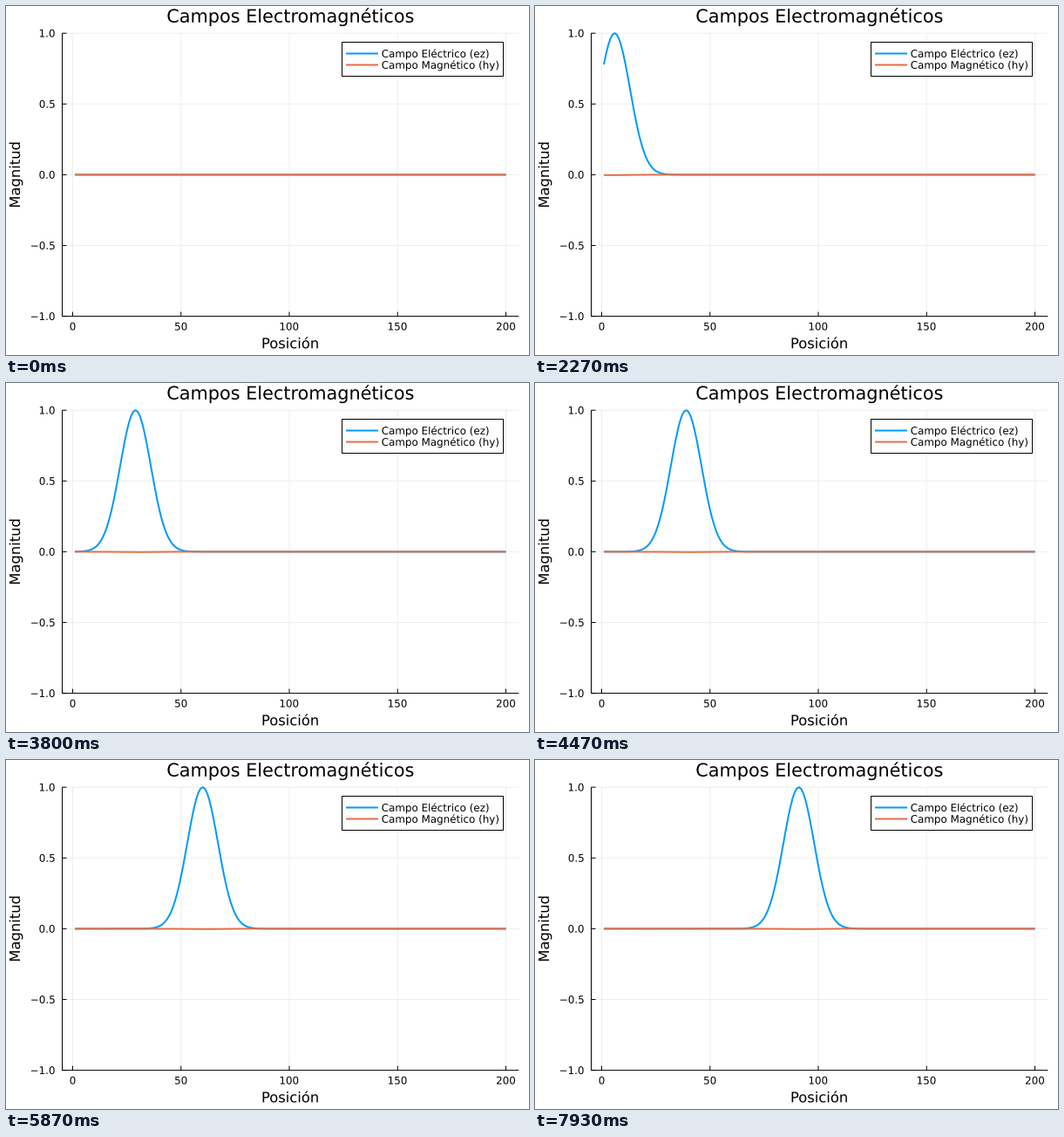
Animation, 600 px wide and 400 px high, one loop 8000 ms. Source, as a matplotlib script:

```python
import numpy as np
import matplotlib.pyplot as plt
from matplotlib.animation import FuncAnimation
from matplotlib.patches import PathPatch, Rectangle
from matplotlib.textpath import TextPath
from matplotlib.transforms import Affine2D

WIDTH, HEIGHT, DPI = 600, 400, 100
LOOP_MS, INTERVAL = 8000, 20
STEPS_PER_MS = 15 / 1000
LEFT, RIGHT, TOP, BOTTOM = 64.5, 588.3, 31.2, 355.6
BLUE, ORANGE, GRID = "#009AFA", "#E36F47", "#EEEEEE"
IMPEDANCE = 377

fig = plt.figure(figsize=(WIDTH / DPI, HEIGHT / DPI), dpi=DPI, facecolor="white")
ax = fig.add_axes([0, 0, 1, 1])
ax.set(xlim=(0, WIDTH), ylim=(HEIGHT, 0))
ax.axis("off")


def to_x(position):
    return 76.5 + 2.485 * position


def to_y(value):
    return (TOP + BOTTOM) / 2 - value * (BOTTOM - TOP) / 2


def stroke(x, y, color="black", width=1.0, **style):
    return ax.plot(x, y, color=color, lw=width * 72 / DPI, snap=False,
                   solid_capstyle="butt", **style)[0]


def label(x, y, text, size=11.9, align=0.5, angle=0, zorder=3):
    """Outline text on a baseline; align runs from 0 (left) to 1 (right)."""
    path = TextPath((0, 0), text, size=size, prop={"family": "DejaVu Sans"})
    box = path.get_extents()
    shift = box.x0 + align * box.width
    place = Affine2D().translate(-shift, 0).scale(1, -1).rotate_deg(angle).translate(x, y)
    ax.add_patch(PathPatch(place.transform_path(path), fc="black", lw=0,
                           snap=False, zorder=zorder))


# Grid, ticks and tick labels
for position in range(0, 201, 50):
    x = to_x(position)
    stroke([x, x], [TOP, BOTTOM], GRID)
    stroke([x, x], [BOTTOM, BOTTOM - 5])
    label(x, 371.5, str(position))
for value in (-1, -0.5, 0, 0.5, 1):
    y = to_y(value)
    stroke([LEFT, RIGHT], [y, y], GRID)
    stroke([LEFT, LEFT + 5], [y, y])
    label(55.7, y + 4.35, f"{value:.1f}".replace("-", "\u2212"), align=1)
stroke([LEFT, LEFT], [TOP, BOTTOM])
stroke([LEFT, RIGHT], [BOTTOM, BOTTOM])

label(326.4, 18.8, "Campos Electromagnéticos", 20.8)
label(326.2, 392.3, "Posición", 16.35)
label(16, 193.3, "Magnitud", 16.35, angle=-90)

# Field curves
cells = np.arange(200)
plot_area = Rectangle((LEFT, 30), RIGHT - LEFT, BOTTOM - 30, transform=ax.transData)
electric, magnetic = (
    stroke(to_x(cells + 1), np.full(200, to_y(0)), color, 2, clip_path=plot_area)
    for color in (BLUE, ORANGE)
)

# Legend
ax.add_patch(Rectangle((385.5, 41.5), 185, 39, fc="white", ec="black",
                       lw=72 / DPI, snap=False, zorder=3))
for y, color, text in ((54.5, BLUE, "Campo Eléctrico (ez)"),
                       (67.5, ORANGE, "Campo Magnético (hy)")):
    stroke([390, 427], [y, y], color, 2, zorder=4)
    label(431.4, y + 4.35, text, align=0, zorder=4)


def pulse(delay):
    """Gaussian source value seen after the given number of steps."""
    return np.where(delay >= 0, np.exp(-((delay - 29) ** 2) / 100), 0)


def update(frame):
    step = int((frame * INTERVAL + 14) * STEPS_PER_MS)
    electric.set_ydata(to_y(pulse(step - cells)))
    magnetic.set_ydata(to_y(-pulse(step - 1 - cells) / IMPEDANCE))
    return electric, magnetic


anim = FuncAnimation(fig, update, frames=LOOP_MS // INTERVAL, interval=INTERVAL,
                     repeat=True, repeat_delay=0)
plt.show()
```
